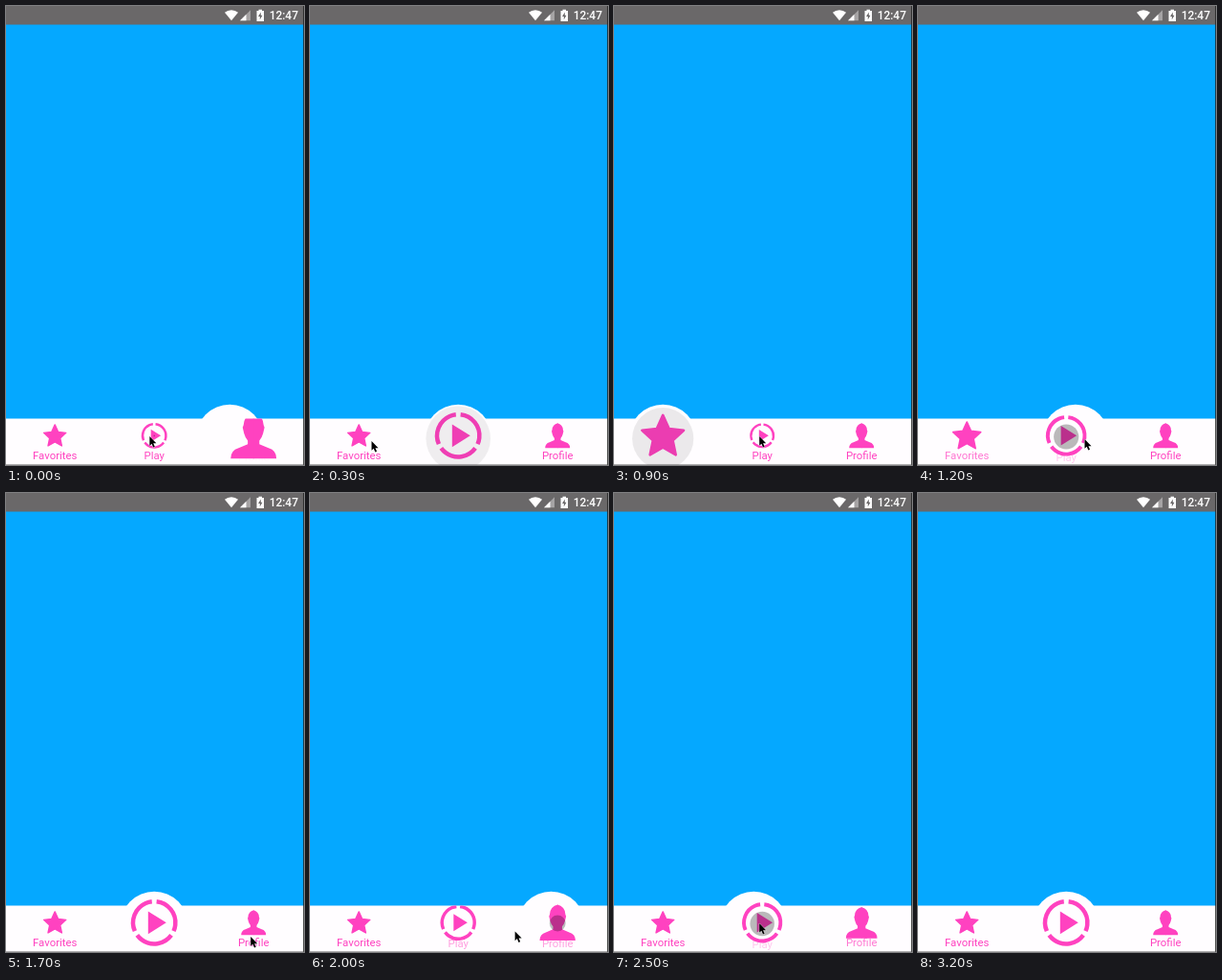
Animation of 312 by 480 pixels, one loop 3300 ms. Source, as an HTML page with a canvas:

```html
<!DOCTYPE html>
<html lang="en">
<head>
<meta charset="utf-8">
<title>Bottom navigation</title>
<style>
html, body { margin: 0; width: 100%; height: 100%; overflow: hidden; }
canvas { display: block; }
</style>
</head>
<body>
<canvas id="stage" width="312" height="480"></canvas>
<script>
const ctx = document.getElementById('stage').getContext('2d');
const WIDTH = 312, HEIGHT = 480, TURN = Math.PI * 2;
const LOOP = 3300, STEP = 100, SLIDE = 300, RIPPLE = 350;
const PINK = '#ff42c0', WHITE = '#fffdff', BLUE = '#05a8ff', GREY = '#6a6869';
const BAR_TOP = 431.5, BUBBLE_Y = 452.5, BUBBLE_R = 35.7, ICON_Y = 449.3, GROWTH = 1.88;

const clamp = v => Math.max(0, Math.min(1, v));
const mix = (a, b, k) => a + (b - a) * k;
const ease = k => 0.5 - 0.5 * Math.cos(Math.PI * clamp(k));
const overshoot = k => k + Math.sin(Math.PI * k) * (0.22 + 0.43 * k);

const halfPerson = new Path2D(`M-.2-13Q5.4-11.7 5.7-6L6.2-4.6 5.4-1.3
  Q4.6 1.5 3.3 2.8V4.8L8.5 7Q13 8.3 13 13H-.2Z`);
const bolt = new Path2D('M266.8 6.5 264 11h1.8v3.2l2.7-4.5h-1.7z');
const arrow = new Path2D('M0 0V9.8L2.2 7.7 3.8 11.5 5.5 10.8 3.9 7.2H7Z');

function drawStar() {
  ctx.beginPath();
  for (let i = 0; i < 10; i++) {
    const r = i % 2 ? 5.8 : 12.2, a = i * TURN / 10;
    ctx.lineTo(r * Math.sin(a), 0.8 - r * Math.cos(a));
  }
  ctx.closePath();
  ctx.fill();
  ctx.lineWidth = 1.4;
  ctx.lineJoin = 'round';
  ctx.stroke();
}

function drawPlay() {
  const third = TURN / 3, gap = 0.11;
  ctx.lineWidth = 2.4;
  for (let a = -TURN / 4; a < TURN / 2; a += third) {
    ctx.beginPath();
    ctx.arc(0, 0, 11.8, a + gap, a + third - gap);
    ctx.stroke();
  }
  ctx.fill(new Path2D('M-3.4-6.3 6.7 0-3.4 6.3Z'));
}

function drawPerson() {
  ctx.fill(halfPerson);
  ctx.scale(-1, 1);
  ctx.fill(halfPerson);
}

const items = [
  { label: 'Favorites', draw: drawStar, tapY: 456 },
  { label: 'Play', draw: drawPlay, tapY: 450 },
  { label: 'Profile', draw: drawPerson, tapY: 464 }
];
items.forEach((item, i) => item.x = 51.2 + 104 * i);
const [favorites, play, profile] = items;

// The last tap of one loop leads into the next.
const taps = [
  { time: -440, item: profile },
  { time: -39, item: play },
  { time: 571, item: favorites },
  { time: 1006, item: play },
  { time: 1850, item: profile },
  { time: 2309, item: play }
];

function drawItem({ x, label, draw }, active) {
  ctx.fillStyle = ctx.strokeStyle = PINK;
  ctx.globalAlpha = 1 - active;
  ctx.font = '11.4px Roboto, sans-serif';
  ctx.textAlign = 'center';
  ctx.fillText(label, x, 473.5 + 3 * active);
  ctx.globalAlpha = 1;
  ctx.save();
  ctx.translate(x, ICON_Y);
  const scale = mix(1, GROWTH, active);
  ctx.scale(scale, scale);
  draw();
  ctx.restore();
}

function drawRipple(x, age) {
  const spread = clamp((age / RIPPLE) ** 1.7);
  ctx.fillStyle = `rgba(0,0,0,${0.27 * clamp((380 - age) / 180)})`;
  ctx.beginPath();
  ctx.arc(x, mix(ICON_Y, BUBBLE_Y, spread), BUBBLE_R * spread, 0, TURN);
  ctx.fill();
}

function drawNavigation(t, current, previous) {
  const age = t - current.time, k = clamp(age / SLIDE), grown = ease(k);
  const bar = new Path2D();
  bar.rect(0, BAR_TOP, WIDTH, HEIGHT - BAR_TOP);
  const bubble = new Path2D();
  bubble.arc(mix(previous.item.x, current.item.x, overshoot(k)), BUBBLE_Y, BUBBLE_R, 0, TURN);
  const shape = new Path2D(bar);
  shape.addPath(bubble);
  ctx.fillStyle = WHITE;
  ctx.fill(bar);
  ctx.fill(bubble);

  // Only the chosen item may rise above the bar.
  for (const item of items) {
    const chosen = item === current.item;
    ctx.save();
    ctx.clip(chosen ? shape : bar);
    drawItem(item, chosen ? grown : item === previous.item ? 1 - grown : 0);
    if (chosen) drawRipple(item.x, age);
    ctx.restore();
  }
}

function drawStatusBar() {
  ctx.fillStyle = GREY;
  ctx.fillRect(0, 0, WIDTH, 19.5);
  const signal = (size, color) => {
    ctx.fillStyle = color;
    ctx.fill(new Path2D(`M245 15.3h${size}v${-size}z`));
  };
  signal(11, '#a5a3a4');
  signal(6.5, '#fff');
  ctx.beginPath();
  ctx.moveTo(236, 15.3);
  ctx.arc(236, 15.3, 11, -TURN * 0.36, -TURN * 0.14);
  ctx.fill();
  ctx.fillRect(262.5, 5, 7.5, 11);
  ctx.fillRect(264.5, 3.7, 3.5, 2);
  ctx.font = '500 11.9px Roboto, sans-serif';
  ctx.textAlign = 'left';
  ctx.fillText('12:47', 275.7, 14.2);
  ctx.fillStyle = GREY;
  ctx.fill(bolt);
}

// The pointer glides to the next item and waits there; at the end it leaves downwards.
function drawPointer(t, current, next) {
  const from = current.item, to = next ? next.item : from;
  const k = next ? ease((t - current.time) / (next.time - current.time) / 0.75) : 0;
  const leave = next ? 0 : ease((t - current.time - 340) / 250);
  ctx.save();
  ctx.translate(mix(from.x, to.x, k) - 3, mix(from.tapY, to.tapY, k) + 34 * leave);
  ctx.strokeStyle = 'rgba(255,255,255,.8)';
  ctx.lineWidth = 1;
  ctx.stroke(arrow);
  ctx.fillStyle = '#000';
  ctx.fill(arrow);
  ctx.restore();
}

function drawEdges() {
  ctx.fillStyle = 'rgba(30,30,30,.75)';
  ctx.fillRect(WIDTH - 1, 0, 1, HEIGHT);
  ctx.fillStyle = 'rgba(30,30,30,.35)';
  ctx.fillRect(0, HEIGHT - 1, WIDTH - 1, 1);
}

function render(now) {
  const t = Math.floor(now % LOOP / STEP) * STEP;
  const index = taps.filter(tap => tap.time <= t).length - 1;
  ctx.fillStyle = BLUE;
  ctx.fillRect(0, 0, WIDTH, HEIGHT);
  drawStatusBar();
  drawNavigation(t, taps[index], taps[index - 1]);
  drawEdges();
  drawPointer(t, taps[index], taps[index + 1]);
}

const origin = performance.now();
function tick() {
  render(performance.now() - origin);
  requestAnimationFrame(tick);
}
tick();
</script>
</body>
</html>
```
